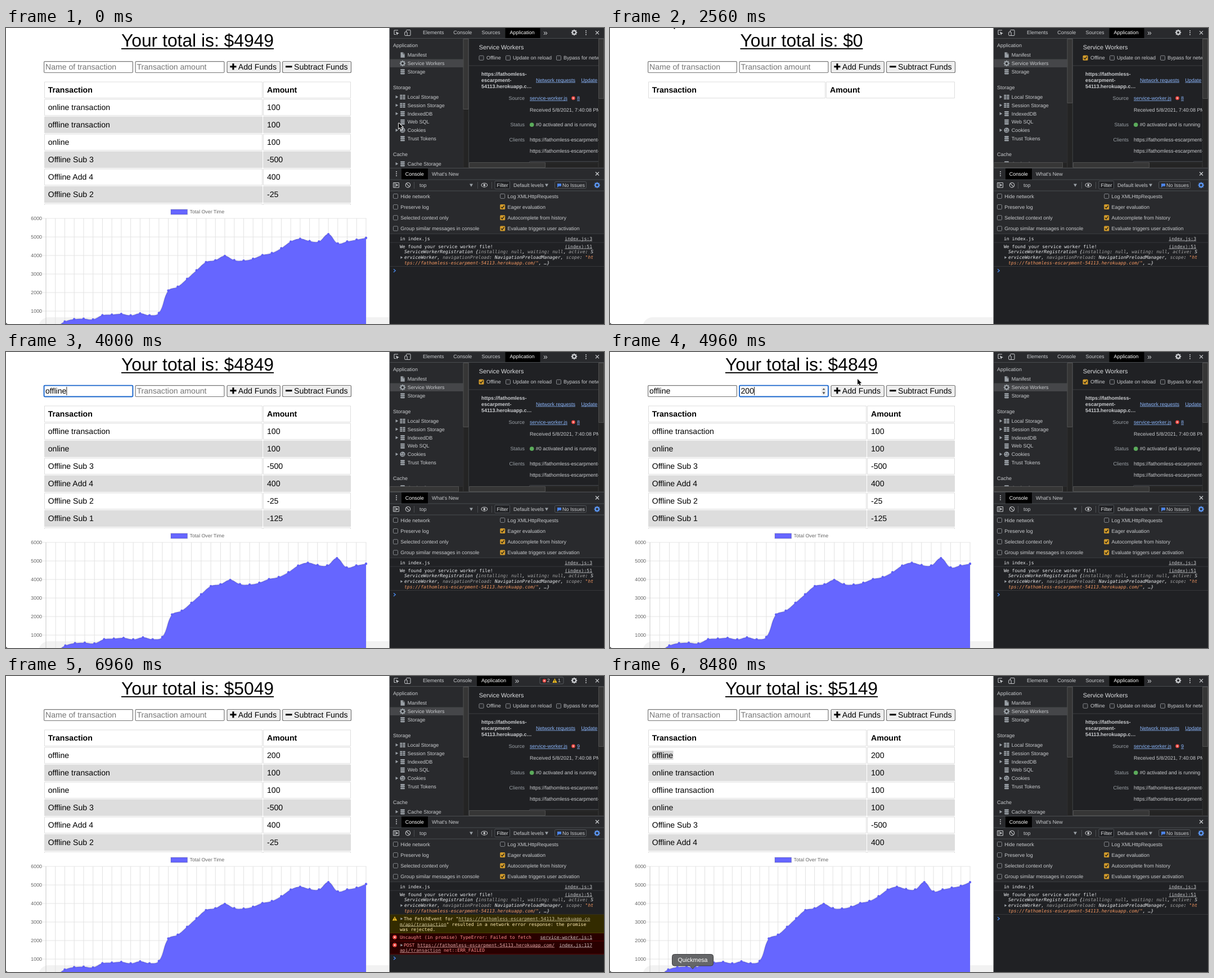
Recreate the animation shown at these times as an HTML page with a canvas. Size 1063x527 px, loop 8640 ms.

```html
<!DOCTYPE html>
<html lang="en">
<head>
<meta charset="utf-8">
<title>Budget tracker</title>
<style>
html, body { margin: 0; width: 100%; height: 100%; overflow: hidden; background: #fff; }
canvas { display: block; width: 1063px; height: 527px; }
</style>
</head>
<body>
<canvas id="stage" width="1063" height="527"></canvas>
<script>
const c = document.getElementById('stage').getContext('2d');
c.textRendering = 'geometricPrecision';
const LOOP = 8640, STEP = 80;
const SANS = '"Liberation Sans", Arial, sans-serif';
const MONO = '"DejaVu Sans Mono", monospace';
const FG = '#c9cbce', DIM = '#9aa0a6', LINK = '#8ab4f8', LINE = '#494c50', BAR = '#292a2d', DARK = '#202124';

// ---------- helpers ----------
function rect(x, y, w, h, fill) { c.fillStyle = fill; c.fillRect(x, y, w, h); }
function box(x, y, w, h, r, fill, stroke, lw = 1) {
  c.beginPath(); c.roundRect(x, y, w, h, r);
  if (fill) { c.fillStyle = fill; c.fill(); }
  if (stroke) { c.strokeStyle = stroke; c.lineWidth = lw; c.stroke(); }
}
function dot(x, y, r, fill) { c.fillStyle = fill; c.beginPath(); c.arc(x, y, r, 0, 7); c.fill(); }
function path(pts, stroke, lw = 1, fill) {
  c.beginPath();
  pts.forEach(([x, y], i) => i ? c.lineTo(x, y) : c.moveTo(x, y));
  if (fill) { c.closePath(); c.fillStyle = fill; c.fill(); }
  if (stroke) { c.strokeStyle = stroke; c.lineWidth = lw; c.stroke(); }
}
// text is placed by its middle line; returns its width
function text(s, x, cy, o = {}) {
  const { size = 9, color = FG, style = '', font = SANS, align = 'left', line = false } = o;
  c.font = `${style} ${size}px ${font}`;
  c.textAlign = align;
  c.fillStyle = color;
  const y = cy + size * 0.355, w = c.measureText(s).width;
  c.fillText(s, x, y);
  if (line) {
    const left = align === 'center' ? x - w / 2 : align === 'right' ? x - w : x;
    c.fillRect(left, y + size * 0.09, w, Math.max(0.8, size * 0.06));
  }
  return w;
}
function mono(s, x, y, color = '#e8eaed', o = {}) { return text(s, x, y, { size: 8.1, font: MONO, color, ...o }); }
function clipped(x, y, w, h, draw) {
  c.save(); c.beginPath(); c.rect(x, y, w, h); c.clip(); draw(); c.restore();
}
function tri(x, y, r, color, down) {
  path(down ? [[x - r, y - r * .7], [x + r, y - r * .7], [x, y + r]] : [[x - r * .7, y - r], [x + r, y], [x - r * .7, y + r]], null, 0, color);
}
function cross(x, y, r, color, lw = 1.2) {
  path([[x - r, y - r], [x + r, y + r]], color, lw);
  path([[x + r, y - r], [x - r, y + r]], color, lw);
}
function errorIcon(x, y, r = 3.8) { dot(x, y, r, '#e8403a'); cross(x, y, r * .4, '#fff', 1); }
function warnIcon(x, y) {
  path([[x, y - 4], [x + 4.2, y + 3.6], [x - 4.2, y + 3.6]], null, 0, '#f4c020');
  rect(x - .5, y - 1.5, 1, 2.6, '#222'); rect(x - .5, y + 1.8, 1, 1, '#222');
}
function gear(x, y, r, color) {
  for (let i = 0; i < 4; i++) {
    const a = i * Math.PI / 4, dx = Math.cos(a) * r, dy = Math.sin(a) * r;
    path([[x - dx, y - dy], [x + dx, y + dy]], color, r * .42);
  }
  dot(x, y, r * .76, color); dot(x, y, r * .38, BAR);
}
function dots(x, y) { [-3.4, 0, 3.4].forEach(d => dot(x, y + d, 1, FG)); }
function check(x, y, on) {
  if (!on) return box(x - 4, y - 4, 8, 8, 1.3, '#26272a', '#85888c');
  box(x - 4.5, y - 4.5, 9, 9, 1.5, '#d29b2b');
  path([[x - 2.6, y], [x - .7, y + 2.1], [x + 2.8, y - 2.4]], '#24211a', 1.4);
}
// the thumb starts at the top or left end of the track
function scrollbar(x, y, w, h, thumb) {
  const frame = (w, h, fill, edge) => box(x + .5, y + .5, w - 1, h - 1, 0, fill, edge, .8);
  frame(w, h, '#242424', '#333');
  frame(w > h ? thumb : w, w > h ? h : thumb, '#363636', '#585858');
}

// ---------- data ----------
const base = [100, 130, 430, 560, 585, 545, 775, 805, 845, 765, 875, 770, 895, 2105, 2310, 2740, 3200, 3640,
  3740, 3975, 3745, 3720, 3820, 4020, 4130, 4390, 4745, 4899, 4774, 4749, 5149, 4649, 4749, 4849];
const oldRows = [['offline transaction', 100], ['online', 100], ['Offline Sub 3', -500], ['Offline Add 4', 400],
  ['Offline Sub 2', -25], ['Offline Sub 1', -125], ['', '']];
const ONLINE = ['online transaction', 100], OFFLINE = ['offline', 200];

// ledger contents and the moment its chart began to grow
function ledger(t) {
  const make = (added, start) => ({
    rows: [...added, ...oldRows],
    values: [...added].reverse().reduce((v, r) => [...v, v[v.length - 1] + r[1]], base),
    grow: 1 - Math.pow(1 - Math.min(1, (t - start) / 285), 4)
  });
  if (t < 2480) return make([ONLINE], -1000);
  if (t <= 2560 || (t >= 7040 && t <= 7120)) return null;
  if (t <= 5120) return make([], 2560);
  if (t < 7040) return make([OFFLINE], 5120);
  return make([OFFLINE, ONLINE], 7120);
}

// ---------- web page ----------
function field(x, hint, value, focused) {
  box(x + .6, 59.6, 157.8, 19.9, 1.5, '#fff', focused ? '#1a66cc' : '#767676', focused ? 1.9 : 1.2);
  const w = text(value || hint, x + 3, 69.3, { size: 14.1, color: value ? '#000' : '#757575' });
  if (focused) rect(x + 3 + (value ? w : 0), 62, 1, 15, '#222');
}
function form(t) {
  const name = t < 3360 || t > 5120 ? '' :
    'offline'.slice(0, t < 3520 ? 1 : t < 4000 ? Math.min(6, 2 + Math.floor((t - 3520) / STEP)) : 7);
  const amount = t < 4560 || t > 5120 ? '' : '200'.slice(0, t < 4720 ? 1 : t < 4800 ? 2 : 3);
  const onAmount = t >= 4400 && t < 5120;
  field(67, 'Name of transaction', name, t >= 2960 && t < 4400);
  field(229.5, 'Transaction amount', amount, onAmount);
  if (onAmount) {
    box(375.5, 62.5, 9, 14, 2, '#efefef');
    path([[377.5, 67.5], [382.5, 67.5], [380, 64.5]], null, 0, '#555');
    tri(380, 73, 2.4, '#555', true);
  }
  box(393, 59.5, 94.3, 20, 2, '#efefef', '#767676', 1.2);
  box(491.5, 59.5, 122, 20, 2, '#efefef', '#767676', 1.2);
  rect(398.3, 67.3, 11.2, 3, '#000'); rect(402.4, 63.2, 3, 11.2, '#000');
  rect(497, 67.3, 11.5, 3, '#000');
  text('Add Funds', 412.8, 69.3, { size: 14.1, color: '#000' });
  text('Subtract Funds', 512, 69.3, { size: 14.1, color: '#000' });
}
function row(i, split, cells, style) {
  const y = 96 + 31 * i, fill = i && i % 2 === 0 ? '#ddd' : '#fff';
  box(68.5, y, split - 68.5, 28.8, 0, fill, '#ddd');
  box(split + 2, y, 610.5 - split, 28.8, 0, fill, '#ddd');
  text(cells[0], 74.7, y + 14, { size: 14.1, color: '#000', style });
  text(String(cells[1]), split + 8.5, y + 14, { size: 14.1, color: '#000', style });
}
function table(data, selected) {
  clipped(60, 90, 560, 225, () => {
    row(0, data ? 455.5 : 382.5, ['Transaction', 'Amount'], 'bold');
    if (!data) return;
    data.rows.slice(0, 7).forEach((r, i) => row(i + 1, 455.5, r));
    if (selected) {
      rect(74.5, 133, 38, 16, '#d4d4d4');
      text('offline', 74.7, 141, { size: 14.1, color: '#000' });
    }
  });
}
function chart({ values, grow }) {
  const y0 = 537, dx = 569 / (values.length - 1);
  const p = values.map((v, i) => [71 + i * dx, y0 - v * grow * 0.033]);
  box(293, 323, 29.5, 9, 0, '#6666ff', 'rgba(0,0,0,.1)', 2);
  text('Total Over Time', 326.5, 327.3, { size: 8.8, color: '#666' });
  for (let k = 1; k <= 6; k++) {
    const y = y0 - 33 * k;
    rect(64.5, y - .5, 576, 1, '#e5e5e5');
    text(k * 1000 + '', 64, y, { size: 8.9, color: '#666', align: 'right' });
  }
  p.forEach(([x], i) => rect(x - .5, 339, 1, 188, i ? '#e2e2e2' : '#c8c8c8'));

  // smooth curve, tension 0.4
  const dist = (a, b) => Math.hypot(a[0] - b[0], a[1] - b[1]);
  const ctrl = p.map((q, i) => {
    const a = p[i - 1] || q, b = p[i + 1] || q;
    const d1 = dist(a, q), d2 = dist(q, b), f1 = .4 * d1 / (d1 + d2 || 1), f2 = .4 * d2 / (d1 + d2 || 1);
    return [q[0] - f1 * (b[0] - a[0]), q[1] - f1 * (b[1] - a[1]), q[0] + f2 * (b[0] - a[0]), q[1] + f2 * (b[1] - a[1])];
  });
  const curve = new Path2D();
  curve.moveTo(...p[0]);
  for (let i = 1; i < p.length; i++)
    curve.bezierCurveTo(ctrl[i - 1][2], ctrl[i - 1][3], ctrl[i][0], ctrl[i][1], ...p[i]);
  const area = new Path2D(curve);
  area.lineTo(640, y0); area.lineTo(71, y0);
  c.fillStyle = '#6666ff'; c.fill(area);
  c.strokeStyle = 'rgba(0,0,0,.1)'; c.lineWidth = 2; c.stroke(curve);
  p.forEach(([x, y]) => dot(x, y, 2.2, '#5f5ff6'));
}
function page(t) {
  const data = ledger(t);
  rect(0, 0, 682, 527, '#fff');
  box(58, 515, 660, 40, 18, '#f2f2f2');
  const total = data ? data.values[data.values.length - 1] : 0;
  text('Your total is: $' + total, 340.5, 21.8, { size: 31.8, color: '#000', align: 'center', line: true });
  form(t);
  table(data, t >= 7600);
  if (data) chart(data);
  path([[0, 524], [.6, 526], [3, 527], [0, 527]], null, 0, '#111');
}

// ---------- developer tools ----------
function topBar(errors) {
  rect(682, 0, 381, 18.5, BAR);
  rect(682, 18, 381, 1, LINE);
  path([[697, 4], [690, 4], [690, 11.5], [693, 11.5]], FG);
  path([[693, 6.5], [699, 9.5], [696.3, 10.3], [695, 13]], null, 0, FG);
  box(711.5, 3.5, 7.5, 10, 1, null, FG);
  box(708.7, 7, 4.5, 6.5, 1, BAR, FG);
  text('Elements', 741, 8.3); text('Console', 795.3, 8.3);
  const x = errors ? 837 : 887.5;
  if (!errors) text('Sources', 845.5, 8.3);
  rect(x, 0, 62, 18, '#000');
  text('Application', x + 8, 8.3, { color: '#fff' });
  text('»', x + 67.5, 7.6, { size: 14 });
  if (errors) {
    box(949, 2, 42, 12, 2, null, '#55585c');
    errorIcon(957, 8.5, 3.2); text('2', 961.7, 8.3);
    warnIcon(975.5, 8.3); text('1', 981, 8.3);
  }
  gear(1010, 8, 5.2, FG); dots(1031, 8.3); cross(1051, 8.3, 3, FG);
}
function treeIcon(kind, x, y) {
  if (kind === 'file') {
    path([[x - 3.5, y - 4.7], [x + 1, y - 4.7], [x + 3.7, y - 2], [x + 3.7, y + 4.7], [x - 3.5, y + 4.7]], null, 0, DIM);
    path([[x + 1, y - 4.7], [x + 1, y - 1.8], [x + 3.7, y - 1.8]], BAR, .8);
  } else if (kind === 'gear') gear(x, y, 5.2, DIM);
  else if (kind === 'grid') {
    for (let r = 0; r < 3; r++) { rect(x - 4.7, y - 4 + r * 3, 4.2, 2.3, DIM); rect(x + .4, y - 4 + r * 3, 4.2, 2.3, DIM); }
  } else if (kind === 'cookie') {
    dot(x, y, 4.6, DIM);
    [[-1.5, -1.5], [1.8, -.5], [-1, 2], [2, 2.3]].forEach(([a, b]) => dot(x + a, y + b, .9, BAR));
  } else for (let r = 0; r < 3; r++) box(x - 4, y - 4.6 + r * 3.3, 8, 2.6, 1.3, DIM);
}
const tree = [
  ['Application', 31], ['Manifest', 48, 'file'], ['Service Workers', 63, 'gear'], ['Storage', 77.8, 'db'],
  ['Storage', 105.8], ['Local Storage', 122.8, 'grid', 1], ['Session Storage', 137.6, 'grid', 1],
  ['IndexedDB', 152.5, 'db', 1], ['Web SQL', 167.3, 'db'], ['Cookies', 182, 'cookie', 1], ['Trust Tokens', 196.9, 'db'],
  ['Cache', 224.8], ['Cache Storage', 241.8, 'db', 1]
];
function sidebar(offline) {
  rect(682, 19, 141, 230, BAR);
  rect(682, 55.5, 131, 14.5, '#454649');
  clipped(682, 19, 131, offline ? 220 : 230, () => tree.forEach(([s, y, icon, arrow]) => {
    text(s, icon ? 713.7 : 688, y);
    if (icon) treeIcon(icon, 705, y);
    if (arrow) tri(694.5, y, 2.7, DIM);
  }));
  scrollbar(812.5, 19, 10, 230, offline ? 115 : 126);
  if (offline) scrollbar(682, 239, 131, 10, 123);
  rect(822.5, 19, 1, 230, LINE);
}
function workers(offline, failures) {
  rect(823, 19, 240, 230, DARK); rect(823, 66.5, 240, 1, '#3c3e41');
  clipped(823, 19, 230, 220, () => {
    text('Service Workers', 840.7, 34, { size: 10.9, color: '#dcdee0' });
    check(845, 53.3, offline); check(892.5, 53.3); check(982.5, 53.3);
    text('Offline', 854, 53.3); text('Update on reload', 901, 53.3); text('Bypass for network', 991, 53.3);
    ['https://fathomless-', 'escarpment-', '54113.herokuapp.c…'].forEach((s, i) =>
      text(s, 845, 81.5 + 11 * i, { style: 'bold' }));
    const link = { color: LINK, line: true }, label = { color: DIM, align: 'right' };
    text('Network requests', 942, 92.6, link); text('Update', 1022.3, 92.6, link);
    text('Source', 922, 125, label); text('Status', 922, 172.3, label); text('Clients', 922, 199, label);
    text('service-worker.js', 931, 125, link);
    errorIcon(1008.5, 124.8, 3.4);
    text(String(failures), 1015, 125, link);
    text('Received 5/8/2021, 7:40:08 PM', 931, 145.7);
    dot(934.7, 172.3, 3.8, '#5bab5b');
    text('#0 activated and is running', 941.7, 172.3);
    text('https://fathomless-escarpment-54113.herokuapp.com/', 931, 199);
    text('https://fathomless-escarpment-54113.herokuapp.com/', 931, 219.3);
    box(930.5, 237.5, 140, 12, 1, null, LINE);
  });
  scrollbar(1053, 19, 10, 230, 107);
  scrollbar(823, 239, 230, 10, 136);
}
function consoleBars() {
  rect(682, 249, 381, 118, BAR);
  [249, 269.5, 289.5, 366.5].forEach(y => rect(682, y, 381, 1, LINE));
  rect(703, 250, 47, 19.5, '#000');
  dots(694, 259.5);
  text('Console', 709.7, 259.5, { color: '#fff' }); text("What's New", 757, 259.5);
  cross(1051, 259.5, 3, FG);
  box(688.5, 275.5, 10, 8.5, 0, null, FG); rect(690.8, 275.5, 1, 8.5, FG); tri(695, 279.7, 2.4, FG);
  c.strokeStyle = FG; c.lineWidth = 1.1; c.beginPath(); c.arc(714.5, 279.7, 4.2, 0, 7); c.stroke();
  path([[711.6, 276.8], [717.4, 282.6]], FG, 1.1);
  text('top', 735, 279.7); tri(827, 279.7, 3, DIM, true);
  c.beginPath(); c.ellipse(850.3, 279.7, 5.3, 3.4, 0, 0, 7); c.strokeStyle = FG; c.stroke(); dot(850.3, 279.7, 1.9, FG);
  [725, 838, 863].forEach(x => rect(x, 274, 1, 12, LINE));
  box(869, 272.5, 26.5, 14, 1, DARK, '#515458');
  text('Filter', 872.5, 280, { color: '#dcdee0' });
  text('Default levels', 902, 279.7); tri(961, 279.7, 3, DIM, true);
  box(975.5, 273.5, 56, 12, 2, null, '#515458');
  path([[980, 277], [987, 277], [987, 281.7], [982.5, 281.7], [980, 284]], null, 0, '#4b83e8');
  text('No Issues', 989, 279.7);
  gear(1050.7, 279.7, 5.2, '#5b95f0');
  const left = ['Hide network', 'Preserve log', 'Selected context only', 'Group similar messages in console'];
  const right = ['Log XMLHttpRequests', 'Eager evaluation', 'Autocomplete from history', 'Evaluate triggers user activation'];
  left.forEach((s, i) => {
    const y = 299.4 + 19.2 * i;
    check(692.5, y); text(s, 701.3, y);
    check(882.7, y, i > 0); text(right[i], 891.5, y);
  });
}
// parts alternate between given colours on one line
function run(x, y, parts, o) { parts.forEach(([s, color]) => { x += mono(s, x, y, color, o); }); }
function consoleLog(errors) {
  rect(682, 367, 381, 160, DARK);
  const src = { align: 'right', line: true }, it = { style: 'italic' };
  mono('in index.js', 700, 375); mono('index.js:3', 1042, 375, '#c4c6c9', src);
  rect(682, 381.5, 381, .8, '#3b3d40');
  mono('We found your service worker file!', 700, 389); mono('(index):51', 1042, 389, '#c4c6c9', src);
  const W = '#eceef0', G = '#a6a6a6', O = '#f79a63';
  run(708, 398.6, [['ServiceWorkerRegistration {', W], ['installing', G], [': ', W], ['null', G], [', ', W], ['waiting', G],
    [': ', W], ['null', G], [', ', W], ['active', G], [': S', W]], it);
  run(708, 408.3, [['erviceWorker, ', W], ['navigationPreload', G], [': NavigationPreloadManager, ', W], ['scope', G],
    [': ', W], ['"ht', O]], it);
  run(708, 418, [['tps://fathomless-escarpment-54113.herokuapp.com/"', O], [', …}', W]], it);
  tri(703, 408.6, 2.3, DIM);
  rect(682, 424, 381, .8, '#3b3d40');
  if (errors) {
    const Y = '#ffebb5', R = '#ff8c8c', url = { line: true };
    rect(682, 424.5, 381, 33, '#332b00'); rect(682, 457, 381, 1, '#4a3d00');
    warnIcon(691, 432); tri(703, 432.3, 2.3, DIM);
    let x = 707 + mono('The FetchEvent for "', 707, 432.2, Y);
    mono('https://fathomless-escarpment-54113.herokuapp.co', x, 432.2, '#cfc59c', url);
    x = 700 + mono('m/api/transaction', 700, 441.7, '#cfc59c', url);
    mono('" resulted in a network error response: the promise', x, 441.7, Y);
    mono('was rejected.', 700, 451.2, Y);
    rect(682, 458, 381, 37, '#290000'); rect(682, 471.3, 381, 1, '#5c0000'); rect(682, 494.7, 381, 1, '#5c0000');
    errorIcon(691, 465); errorIcon(691, 479);
    mono('Uncaught (in promise) TypeError: Failed to fetch', 700, 465, R);
    mono('service-worker.js:1', 1042, 465, '#cfbcbc', src);
    tri(703, 479.2, 2.3, DIM);
    x = 707 + mono('POST ', 707, 479, R);
    mono('https://fathomless-escarpment-54113.herokuapp.com/', x, 479, '#e0a3a3', url);
    rect(977, 473, 86, 12, '#290000');
    mono('index.js:117', 1042, 479, '#cfbcbc', src);
    x = 700 + mono('api/transaction', 700, 488.6, '#e0a3a3', url);
    mono(' net::ERR_FAILED', x, 488.6, R);
  }
  const y = errors ? 502.5 : 432;
  path([[689, y - 2.8], [692.3, y], [689, y + 2.8]], '#4a8af0', 1.3);
}
function tools(t) {
  const offline = t >= 1040 && t < 6000, errors = t >= 5280 && t < 7040;
  topBar(errors);
  sidebar(offline);
  workers(offline, t >= 5280 ? 9 : 8);
  consoleBars();
  consoleLog(errors);
  rect(681.5, 0, 1, 527, '#3c3e41');
}

// ---------- pointer ----------
const track = [
  [80, 698, 169], [960, 845, 51], [1200, 845, 51], [1840, 211, 26], [2080, 62, 6], [2240, 110, -10],
  [2640, 110, -10], [2960, 117, 74], [4080, 117, 74], [4400, 290, 70], [4560, 290, 70], [4960, 440, 48],
  [5120, 438, 66], [5360, 438, 66], [5920, 845, 51], [6160, 845, 51], [6640, 110, -14], [7040, 110, -14],
  [7200, 233, 51], [7520, 96, 137], [7760, 96, 137], [8400, 147, 530]
];
const clicks = [[1040, 1200], [2960, 3120], [4400, 4480], [5120, 5200], [6000, 6160], [7600, 7760]];
const hidden = [[3280, 4080], [4560, 4960]];
const within = (list, t) => list.some(([a, b]) => t >= a && t < b);

function pointer(t) {
  if (within(hidden, t)) return;
  let i = track.findIndex(k => k[0] > t);
  if (i < 0) i = track.length;
  const a = track[Math.max(0, i - 1)], b = track[Math.min(i, track.length - 1)];
  const u = b[0] > a[0] ? (t - a[0]) / (b[0] - a[0]) : 0, e = u * u * (3 - 2 * u);
  const x = a[1] + (b[1] - a[1]) * e, y = a[2] + (b[2] - a[2]) * e;
  if (within(clicks, t)) dot(x + 1, y + 1, 21.3, 'rgba(245,222,80,.68)');
  const beam = x < 388 && x > 67 && ((y > 59 && y < 80) || (t >= 7520 && y > 130 && y < 148));
  if (beam) {
    path([[x - 2.5, y - 6], [x, y - 5], [x + 2.5, y - 6]], '#222', 1.1);
    path([[x, y - 5], [x, y + 5]], '#222', 1.2);
    path([[x - 2.5, y + 6], [x, y + 5], [x + 2.5, y + 6]], '#222', 1.1);
    path([[x - 1.5, y + 2], [x + 1.5, y + 2]], '#222');
  } else {
    const arrow = [[0, 0], [0, 10], [2.3, 8], [4, 12], [5.8, 11.2], [4.1, 7.4], [7.2, 7.2], [0, 0]];
    const pts = arrow.map(([dx, dy]) => [x + dx, y + dy]);
    path(pts, '#fff', 1.8);
    path(pts, null, 0, '#000');
  }
}
function dockLabel() {
  box(110.5, 495.5, 73, 20.5, 4, '#656668', '#3d3e40');
  path([[141.5, 515.7], [147, 521.5], [152.5, 515.7]], '#3d3e40', 1, '#656668');
  rect(142, 514, 10, 2.2, '#656668');
  text('Quickmesa', 147, 505.7, { size: 10.6, color: '#fff', align: 'center' });
}

function frame(now) {
  const t = Math.floor(now % LOOP / STEP) * STEP;
  c.clearRect(0, 0, 1063, 527);
  page(t);
  tools(t);
  pointer(t);
  if (t >= 8400) dockLabel();
}
const begin = performance.now();
function tick() {
  frame(performance.now() - begin);
  requestAnimationFrame(tick);
}
tick();
</script>
</body>
</html>
```
